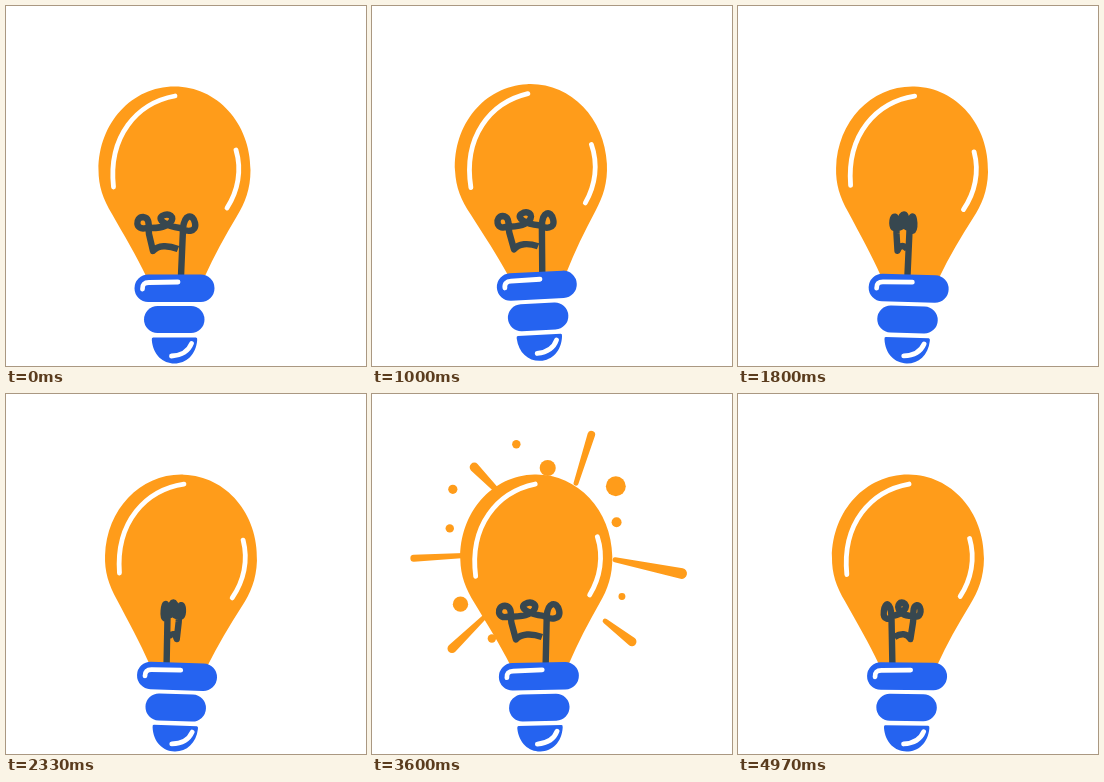
An HTML page for the animation above (5 s loop, 360 by 360 pixels).

```html
<!DOCTYPE html>
<html lang="en">
<head>
<meta charset="utf-8">
<title>Light bulb</title>
<style>
  html, body { margin: 0; width: 100%; height: 100%; overflow: hidden; background: #fff; }
  svg { display: block; width: 100vw; height: 100vh; }
  .line { fill: none; stroke: #fff; stroke-width: 4.8; stroke-linecap: round; stroke-linejoin: round; }
  #filament { stroke: #37474f; stroke-width: 6.4; stroke-linecap: butt; }
</style>
</head>
<body>
<svg viewBox="0 0 360 360">
  <g id="rays" fill="#ff9c1a"></g>
  <g id="bulb">
    <path fill="#ff9c1a" d="M140 270C131 251 118 229 106 208C97 193 92.5 180 92.5 164C92.5 117 126 80.5 168.5 80.5S244.5 117 244.5 164C244.5 183 239 197 231 210C219 230 208 250 199 270Z"/>
    <path class="line" d="M169 90C131 97 102 130 107.5 181"/>
    <path class="line" d="M230 144C236 164 232 185 221 202"/>
    <path id="filament" class="line"/>
    <g fill="#2563f0">
      <rect x="128.5" y="268.5" width="80" height="27.5" rx="13.7"/>
      <rect x="138" y="300" width="60.5" height="27" rx="13.5"/>
      <path d="M147 331.5H190Q191.5 331.5 191.2 334C190 349 180 357.5 168.5 357.5S147 349 145.8 334Q145.500 331.500 147 331.500Z"/>
    </g>
    <path class="line" d="M136.5 283Q136 276.500 143 276.500L172 276"/>
    <path class="line" d="M165.5 350Q181 349 185.5 337.500"/>
  </g>
</svg>
<script>
const LOOP = 5000;
const AXIS = 162;
const $ = id => document.getElementById(id);
const rad = deg => deg * Math.PI / 180;

const wire = "M175,270L177,223C178,208 187,207 189,217C191,227 180,226 174,222" +
  "C160,220 151,214 156,210C163,206 170,211 164,217C157,223 147,222 140,222" +
  "C129,225 129,211 137,211C145,212 142,221 143,228L147,245C152,239 162,239 172,243";

// Outer end, inner end, outer radius.
const rays = [
  [83, 45, 117, 80, 6], [236, 2.5, 216, 66, 5], [4, 164, 70, 160.5, 4.5],
  [354, 184, 267, 166, 7], [54, 282, 95, 242, 6], [289, 273, 254, 246, 6]
];
const dots = [
  [138, 15, 5.5], [179, 46, 10.5], [55, 74, 6], [51, 125, 5.5], [268, 70, 13],
  [269, 117, 6.5], [65, 224, 10], [106, 269, 5.5], [276, 214, 4.5]
];

function taper([x1, y1, x2, y2, r1], r2 = 3.2) {
  const len = Math.hypot(x2 - x1, y2 - y1);
  const nx = (y1 - y2) / len, ny = (x2 - x1) / len;
  const at = (x, y, r) => `${x + nx * r} ${y + ny * r}`;
  return `<path d="M${at(x1, y1, r1)}A${r1} ${r1} 0 0 1 ${at(x1, y1, -r1)}` +
    `L${at(x2, y2, -r2)}A${r2} ${r2} 0 0 1 ${at(x2, y2, r2)}Z"/>`;
}

const progress = (t, from, to) => Math.min(1, Math.max(0, (t - from) / (to - from)));
const ease = (t, from, to) => {
  const u = progress(t, from, to);
  return u * u * (3 - 2 * u);
};
const arc = (t, from, to) => Math.sin(Math.PI * progress(t, from, to));

// A swing that starts gently and dies away, in degrees.
function sway(t) {
  const reach = 3.55 * (1 - t / 6000) * ease(t, 0, 900);
  return -reach * Math.cos(2 * Math.PI * (t - 880) / 2520);
}

// A short dip, then a hop.
const hop = t => 2 * arc(t, 150, 600) - 8 * arc(t, 600, 1050);

// A slow turn with one quick revolution on top, in degrees.
const spin = t => -24 + 0.052 * t + 360 * ease(t, 2050, 4800);

function draw(t) {
  $("bulb").setAttribute("transform", `translate(0 ${hop(t)}) rotate(${sway(t)} 168.5 357)`);

  const turn = Math.cos(rad(spin(t))) / Math.cos(rad(24));
  $("filament").setAttribute("d", wire.replace(/(\d+),/g, (_, x) => `${AXIS + (x - AXIS) * turn},`));

  const burst = ease(t, 2740, 2960) - ease(t, 3500, 3760);
  $("rays").setAttribute("display", burst > 0 ? "inline" : "none");
  $("rays").setAttribute("transform", `translate(165 165) scale(${0.3 + 0.7 * burst}) translate(-165 -165)`);
}

$("rays").innerHTML = rays.map(ray => taper(ray)).join("") +
  dots.map(([x, y, r]) => `<circle cx="${x}" cy="${y}" r="${r}"/>`).join("");

const start = performance.now();
function tick() {
  draw((performance.now() - start) % LOOP);
  requestAnimationFrame(tick);
}
tick();
</script>
</body>
</html>
```
